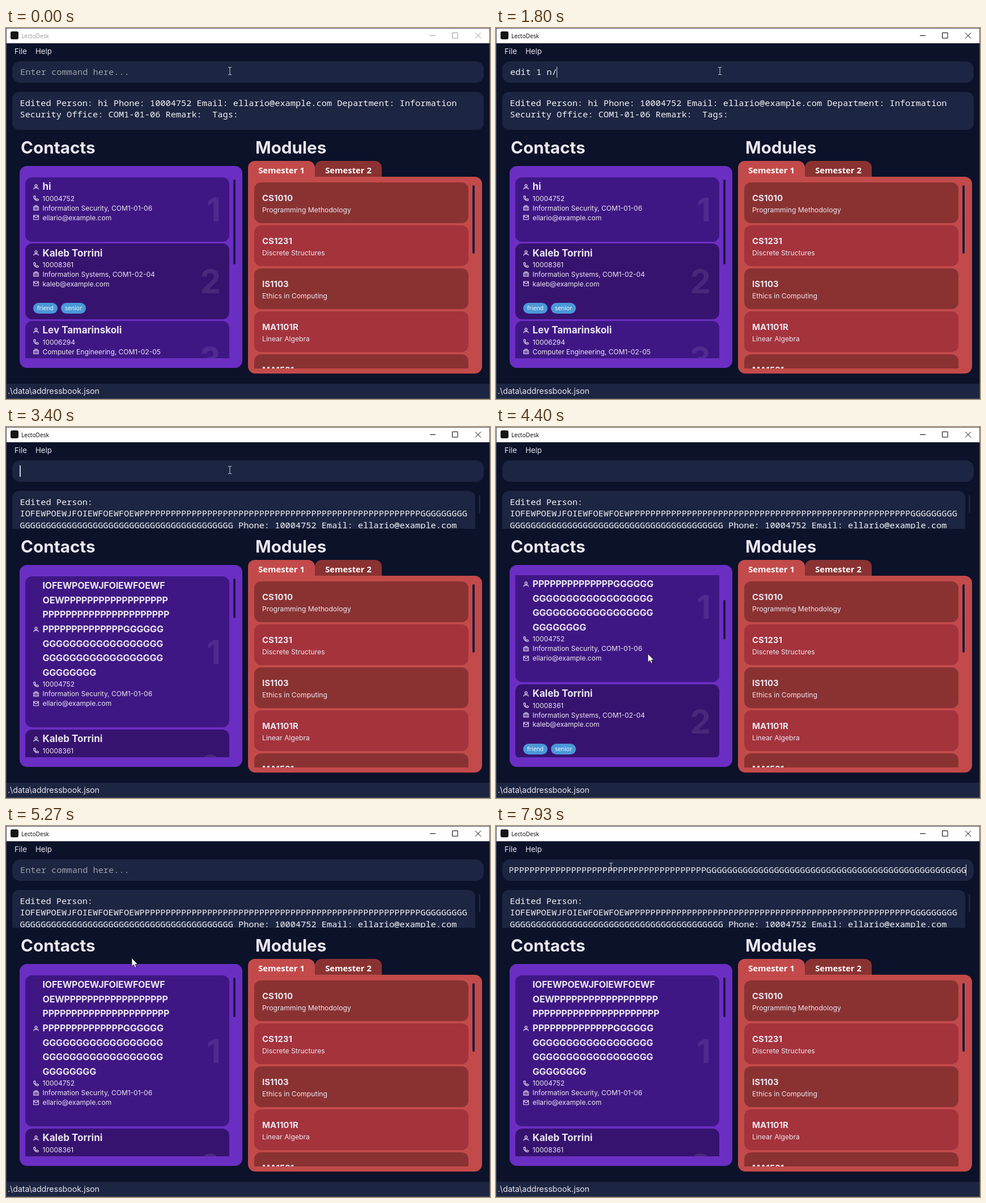
Write an HTML page that moves like this. It is 854 by 656 pixels and loops after 8000 ms.

```html
<!DOCTYPE html>
<html lang="en">
<head>
<meta charset="utf-8">
<title>Contact manager</title>
<style>
html, body { margin: 0; width: 100%; height: 100%; overflow: hidden; background: #0b1229; }
#app { position: absolute; left: 0; top: 0; width: 854px; height: 656px; overflow: hidden; background: #0b1229; color: #ebe7f1; font: 12px Inter, sans-serif; }
#app div, #app svg.abs { position: absolute; }
.t { line-height: 20px; white-space: pre; }
.mono { font: 15.3px/20.4px "Noto Sans Mono", monospace; white-space: pre; }

#bar { left: 0; top: 0; width: 854px; height: 27px; background: #fff; color: #999; }
#bar.active { color: #000; }
#mark { left: 8px; top: 6px; width: 14px; height: 14px; border-radius: 3px; background: #151515; }
#bar .t { left: 27px; top: 4px; font: 10.2px/20px "Open Sans", sans-serif; }
#buttons { left: 740px; top: 0; fill: none; stroke: currentColor; }
#edge { inset: 0; box-shadow: inset 0 0 0 1px #4b4f5c; }
.menu { top: 31px; font-size: 13.2px; }

#field { left: 11px; top: 59px; width: 832px; height: 38px; border-radius: 14px; background: #1c2541; }
#clip { left: 13px; top: 8px; width: 806px; height: 22px; overflow: hidden; }
#input { left: 1px; top: 0; color: #f1f1f3; }
#input.hint { color: #9ea0a8; }
#input.full { left: auto; right: 0; }
#caret { top: 9px; width: 1.4px; height: 20px; background: #cfd2da; }

#result { left: 11px; top: 113px; width: 832px; height: 67px; border-radius: 12px; background: #1c2541; overflow: hidden; }
#result.long { width: 817px; border-radius: 12px 12px 0 0; }
#output { left: 13.5px; top: 8.8px; color: #f4f4f6; }
#resultThumb { left: 834px; top: 120px; width: 3px; height: 32px; border-radius: 2px; background: #1c2541; }

.head { top: 191px; font-size: 29.7px; font-weight: 700; }

#contacts { left: 24px; top: 244px; width: 393px; height: 357px; border-radius: 13px; background: #6b2ec3; }
.view { overflow: hidden; }
#contacts .view { left: 10px; top: 18px; width: 360px; height: 322px; }
#list { left: 0; top: 2px; width: 360px; }
#app .card { position: relative; box-sizing: border-box; margin-bottom: 3.4px; padding: 4.3px 0 34.3px; border-radius: 12px; background: #3f1784; }
#app .card:nth-child(even) { background: #371370; }
#app .card.tagged { padding-bottom: 53.8px; }
#app .row { position: relative; display: flex; align-items: center; height: 16.9px; padding-left: 14px; white-space: pre; }
#app .name { height: auto; line-height: 25.6px; margin-bottom: -1px; font-size: 17px; font-weight: 700; }
#app .name.long span { font-size: 16px; letter-spacing: -.2px; }
.row svg { width: 10px; height: 10px; margin-right: 6.5px; fill: none; stroke: #ebe7f1; stroke-width: 1.1; }
.number { right: 15px; top: 50%; transform: translateY(-50%); font: 700 58px/58px Inter, sans-serif; color: rgba(255, 255, 255, .09); }
.tags { left: 14px; bottom: 9.5px; display: flex; gap: 6px; }
.tags span { padding: 0 7px; border-radius: 10px; background: #4a98d8; color: #fff; font: 10.4px/19px "Open Sans", sans-serif; }
.thumb { width: 3.5px; border-radius: 2px; background: #1c1a40; }
#listThumb { left: 377px; top: 24px; }

.tab { top: 235px; width: 118px; height: 30px; border-radius: 12px 12px 0 0; color: #fff; font: 700 14.8px/32px "Open Sans", sans-serif; text-align: center; }
#modules { left: 427px; top: 263px; width: 413px; height: 348px; border-radius: 0 13px 13px 13px; background: #c34a4a; }
#modules .view { left: 11px; top: 10px; width: 378px; height: 329px; }
.module { width: 378px; height: 72px; border-radius: 12px; background: #a4333c; }
.module:nth-child(odd) { background: #8a3232; }
.code { left: 14px; top: 18px; font-size: 15px; font-weight: 700; }
.topic { left: 14px; top: 38.5px; font-size: 12.2px; }

#status { left: 0; top: 629px; width: 854px; height: 27px; background: #1c2541; }
#status .t { left: 3px; top: 3px; font-size: 14.2px; }
#pointer { left: 0; top: 0; overflow: visible; }
</style>
</head>
<body>
<div id="app">
  <div id="bar">
    <div id="mark"></div><div class="t">LectoDesk</div>
    <svg id="buttons" class="abs" width="110" height="27"><path d="M8 13.5h10M47.5 8.5h9.5v9.5h-9.5zM88 8.5l10 10M98 8.5l-10 10"/></svg>
  </div>
  <div class="t menu" style="left:15px">File</div>
  <div class="t menu" style="left:52px">Help</div>

  <div id="field"><div id="clip"><div id="input" class="mono"></div></div><div id="caret"></div></div>
  <div id="result"><div id="output" class="mono"></div></div>
  <div id="resultThumb"></div>

  <div class="t head" style="left:26px;line-height:40px;top:191px">Contacts</div>
  <div class="t head" style="left:440px;line-height:40px;top:191px">Modules</div>

  <div id="contacts"><div class="view"><div id="list"></div></div><div id="listThumb" class="thumb"></div></div>

  <div class="tab" style="left:545px;background:#8a3232">Semester 2</div>
  <div class="tab" style="left:427px;background:#c34a4a">Semester 1</div>
  <div id="modules"><div class="view" id="moduleList"></div><div class="thumb" style="left:396px;top:15px;height:121px"></div></div>

  <div id="status"><div class="t">.\data\addressbook.json</div></div>
  <div id="edge"></div>
  <svg id="pointer" class="abs" width="1" height="1">
    <path id="beam" d="M-3 -6.5h2.2l.8 .8l.8 -.8h2.2M0 -6v12M-3 6.5h2.2l.8 -.8l.8 .8h2.2" fill="none" stroke="#d5d7dc"/>
    <path id="arrow" d="M0 0v15l3.5 -3.2l2.3 5.2l2.4 -1l-2.3 -5h4.6z" fill="#fff" stroke="#111" stroke-width=".8"/>
  </svg>
</div>
<script>
const $ = id => document.getElementById(id);
const LOOP = 8000, TICK = 1000 / 15, BLINK = 530, CHAR = 9.18;

const ICONS = {
  user: '<circle cx="5" cy="2.9" r="2"/><path d="M1 9.6V8.6Q1 6.6 3 6.6H7Q9 6.6 9 8.6V9.6"/>',
  phone: '<path d="M1 1.2L3 .7L4.2 3.2L3.1 4.2Q4 6 5.8 6.9L6.8 5.8L9.3 7L8.8 9Q5.5 9.6 2.8 7T1 1.2z"/>',
  office: '<path d="M.7 3H9.3V9H.7zM3.2 3V1H6.8V3M3.2 3V9M6.8 3V9"/>',
  mail: '<path d="M.7 1.2H9.3V8.8H.7zM.7 2.2L5 5.6L9.3 2.2"/>'
};
const row = (icon, text, cls = '') =>
  `<div class="row ${cls}"><svg viewBox="0 0 10 10">${ICONS[icon]}</svg><span>${text}</span></div>`;

const people = [
  ['hi', '10004752', 'Information Security, COM1-01-06', 'ellario'],
  ['Kaleb Torrini', '10008361', 'Information Systems, COM1-02-04', 'kaleb', 'friend', 'senior'],
  ['Lev Tamarinskoli', '10006294', 'Computer Engineering, COM1-02-05', 'levt', 'associate'],
  ['Different Name', '10003578', 'Computer Science, COM1-02-06', 'name', 'friend']
];
$('list').innerHTML = people.map(([name, phone, office, mail, ...tags], i) =>
  `<div class="card ${tags.length ? 'tagged' : ''}">` +
  row('user', name, 'name') + row('phone', phone) + row('office', office) + row('mail', mail + '@example.com') +
  `<div class="number">${i + 1}</div><div class="tags">${tags.map(tag => `<span>${tag}</span>`).join('')}</div></div>`
).join('');

$('moduleList').innerHTML = [
  ['CS1010', 'Programming Methodology'], ['CS1231', 'Discrete Structures'], ['IS1103', 'Ethics in Computing'],
  ['MA1101R', 'Linear Algebra'], ['MA1521', 'Calculus']
].map(([code, topic], i) =>
  `<div class="module" style="top:${i * 76}px"><div class="t code">${code}</div><div class="t topic">${topic}</div></div>`
).join('');

const P = n => 'P'.repeat(n), G = n => 'G'.repeat(n);
const start = 'IOFEWPOEWJFOIEWFOEWFOEW';
const nameLines = [start.slice(0, 20), 'OEW' + P(18), P(22), P(14) + G(6), G(18), G(18), G(8)].join('<br>');
const command = 'edit 1 n/ ', pasted = command + start + P(54) + G(50);
const contact = 'Phone: 10004752 Email: ellario@example.com';
const outputs = {
  short: `Edited Person: hi ${contact} Department: Information\nSecurity Office: COM1-01-06 Remark:  Tags:`,
  long: `Edited Person:\n${start}${P(54)}${G(9)}\n${G(41)} ${contact}`
};

// Each input event is [time, field text].
const typing = times => times.map((time, i) => [time, command.slice(0, i + 1)]);
const events = [
  [200, ''],
  ...typing([530, 600, 730, 800, 870, 1000, 1070, 1670, 1800, 2270]),
  [2530, pasted], [3400, ''], [5730, ''],
  ...typing([6200, 6270, 6400, 6470, 6600, 6670, 6800, 7330, 7470, 7670]),
  [7930, pasted]
];
const scrolls = [[0, 0], [4400, 80], [4470, 160], [4600, 241], [4800, 160], [4870, 80], [4930, 0]];
const moves = [
  [0, 395, 76], [4000, 395, 76], [4130, 335, 230], [4270, 268, 401], [5000, 268, 401],
  [5266, 222, 234], [5466, 206, 65], [5533, 203, 44], [5600, 203, 60], [5800, 203, 72], [8000, 203, 72]
];

const latest = (track, t) => track.filter(([time]) => time <= t).pop();

function pointerAt(t) {
  const i = Math.max(1, moves.findIndex(([time]) => time >= t));
  const [t0, x0, y0] = moves[i - 1], [t1, x1, y1] = moves[i];
  const k = (t - t0) / (t1 - t0);
  return [x0 + (x1 - x0) * k, y0 + (y1 - y0) * k];
}

let edited = null;
function setEdited(value) {
  if (value === edited) return;
  edited = value;
  const name = document.querySelector('.name');
  name.classList.toggle('long', value);
  name.querySelector('span').innerHTML = value ? nameLines : people[0][0];
  $('result').classList.toggle('long', value);
  $('output').textContent = value ? outputs.long : outputs.short;
  $('resultThumb').style.display = value ? '' : 'none';
  $('listThumb').style.height = (value ? 70 : 150) + 'px';
}

function draw(t) {
  const focused = t >= 200 && !(t >= 5060 && t < 5730);
  const [since, text] = latest(events, t) || [0, ''];
  const full = text === pasted;
  $('bar').classList.toggle('active', t >= 130);
  $('input').textContent = focused ? text : 'Enter command here...';
  $('input').className = 'mono' + (focused ? '' : ' hint') + (full ? ' full' : '');
  $('caret').style.left = (full ? 817.6 : 13.3 + text.length * CHAR) + 'px';
  $('caret').style.display = focused && Math.floor((t - since) / BLINK) % 2 === 0 ? '' : 'none';

  setEdited(t >= 3400);
  const scroll = latest(scrolls, t)[1];
  $('list').style.transform = `translateY(${-scroll}px)`;
  $('listThumb').style.transform = `translateY(${scroll * 114 / 241}px)`;

  const [x, y] = pointerAt(t);
  const overText = (y > 59 && y < 97) || (y > 113 && y < 180);
  $('pointer').style.transform = `translate(${x}px, ${y}px)`;
  $('beam').style.display = overText ? '' : 'none';
  $('arrow').style.display = overText ? 'none' : '';
}

const began = performance.now();
function frame() {
  const t = (performance.now() - began) % LOOP;
  draw(Math.min(Math.floor((t + 4) / TICK) * TICK, LOOP - 1));
  requestAnimationFrame(frame);
}
frame();
</script>
</body>
</html>
```
